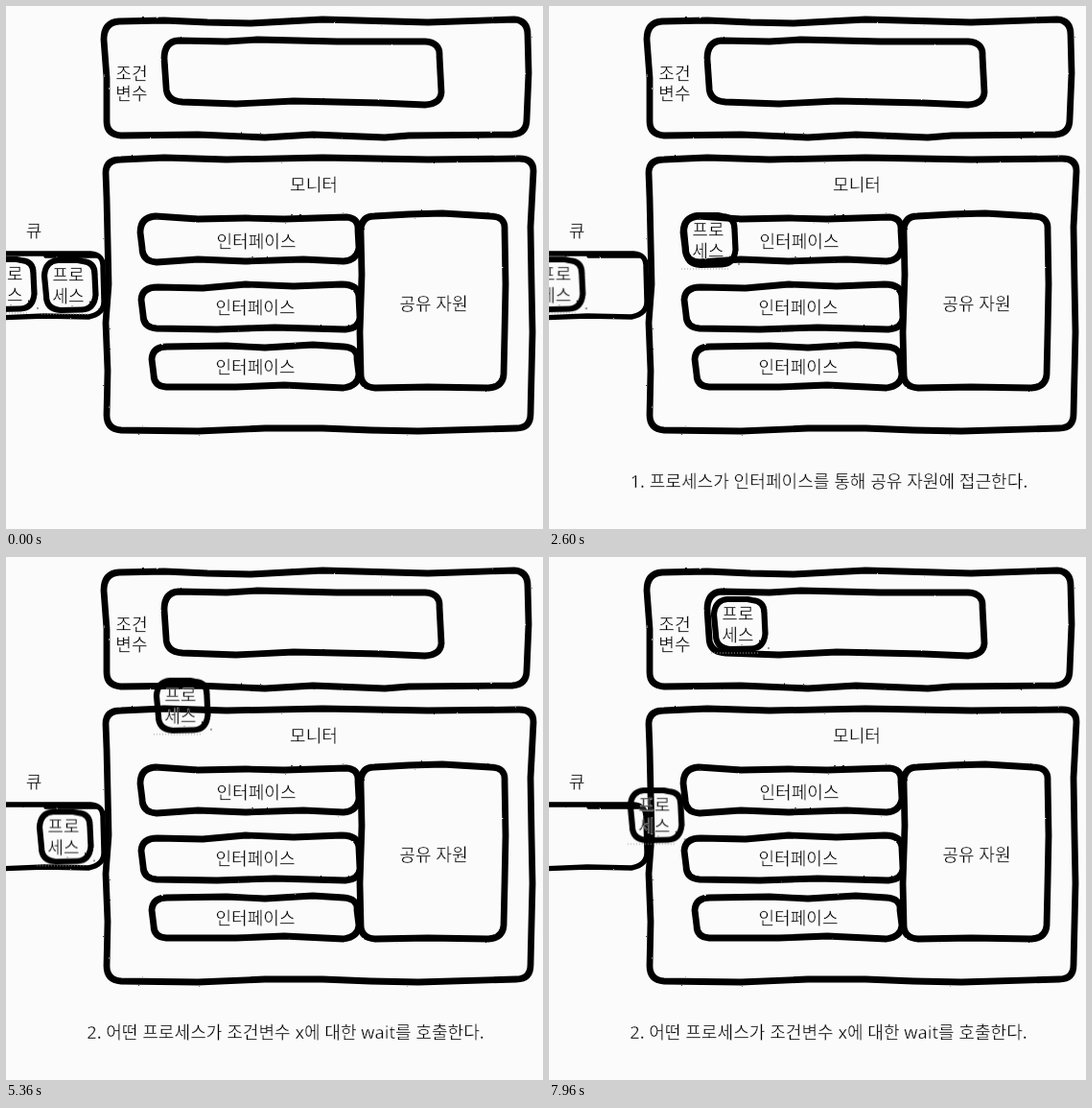
An HTML page that plays this animation: 560 px wide and 545 px high, repeating every 8 s.

```html
<!DOCTYPE html>
<html lang="ko">
<head>
<meta charset="utf-8">
<title>모니터</title>
<style>
html, body { margin: 0; width: 100%; height: 100%; overflow: hidden; background: #fbfbfb; }
svg { display: block; width: 560px; height: 545px; }
path { fill: none; stroke: #000; stroke-width: 6.8; stroke-linejoin: round; stroke-linecap: round; }
/* the thin page-coloured outline lightens the strokes of the letters */
text {
  font: 300 18.1px "Noto Sans", "Noto Sans CJK KR", "Noto Sans KR", "Noto Sans CJK", sans-serif;
  text-anchor: middle; fill: #000; stroke: #fbfbfb; stroke-width: .4;
}
.dust { stroke: #999; stroke-width: 1; stroke-dasharray: 1 2; stroke-linecap: butt; }
.dot { fill: #222; }
</style>
</head>
<body>
<svg viewBox="0 0 560 545">
  <defs>
    <filter id="rough" filterUnits="userSpaceOnUse" x="-60" y="-60" width="680" height="620" color-interpolation-filters="sRGB">
      <feTurbulence type="fractalNoise" baseFrequency=".2" numOctaves="2" seed="4"/>
      <feDisplacementMap in="SourceGraphic" scale="1.6" xChannelSelector="R" yChannelSelector="G"/>
    </filter>
    <g id="process">
      <g filter="url(#rough)">
        <path style="stroke-width:6.2" d="M-12 -26 L9 -26 L14 -25 Q27 -24 26.5 -11 L27.5 10 Q26 25 13 25.5 L-9 26 Q-24 25 -24 11 L-26 -10 Q-25 -25 -12 -26Z"/>
      </g>
      <path class="dust" d="M-29 30H22"/>
      <circle class="dot" cx="31" cy="25" r=".8"/>
      <text x="-1" y="-4">프로</text>
      <text x="-1" y="18">세스</text>
    </g>
  </defs>
  <g filter="url(#rough)">
    <!-- condition variable -->
    <path d="M118 16 L165 15 L210 17 L255 18 L330 14 L440 17 L530 14 Q544 15 544 30 L545 70 L543 118 Q543 133 528 134 L420 135 L395 137 L320 134 L270 137 L200 134 L120 135 Q105 134 105 120 L105 75 L102 35 Q102 17 118 16Z"/>
    <path d="M180 36 L230 37 L262 35 L345 37 L437 37 Q453 38 452 52 L454 90 Q453 102 437 103 L390 101 L300 99 L240 102 L184 100 Q167 99 167 84 L165 55 Q165 37 180 36Z"/>
    <!-- monitor -->
    <path d="M120 160 L165 158 L230 160 L330 158 L440 160 L535 159 Q550 159 550 172 L547 230 L548 290 L549 340 L547 425 Q547 440 532 440 L430 443 L380 442 L330 440 L270 440 L200 443 L120 442 Q105 441 105 426 L106 380 L104 330 L107 290 L105 200 L104 174 Q104 160 120 160Z"/>
    <!-- interfaces -->
    <path d="M156 219 L200 222 L250 221 L290 222 L355 220 Q368 221 367 234 L368 252 Q366 265 352 266 L310 264 L250 266 L200 264 L157 267 Q142 266 142 252 L140 236 Q140 220 156 219Z"/>
    <path d="M158 293 L205 294 L250 290 L300 292 L350 290 Q368 290 368 304 L369 325 Q368 336 354 337 L280 335 L220 337 L157 336 Q143 335 143 322 L141 306 Q142 293 158 293Z"/>
    <path d="M168 355 L230 354 L270 356 L320 353 L352 355 Q367 356 366 368 L368 384 Q367 396 352 398 L290 395 L240 397 L167 397 Q154 396 154 384 L152 368 Q153 355 168 355Z"/>
    <!-- shared resource -->
    <path d="M384 219 L420 217 L455 216 L505 219 Q521 219 520 233 L521 290 L520 340 L519 384 Q518 397 503 398 L440 397 L385 398 Q370 397 370 384 L369 340 L371 280 L370 235 Q370 219 384 219Z"/>
    <!-- queue -->
    <path style="stroke-width:5.4" d="M-10 258 L40 258 L88 258 Q102 259 101 272 L102 308 Q102 321 86 324 L40 323 L-10 325"/>
    <path style="stroke-width:3.4" d="M41 261 H94"/>
  </g>
  <g id="labels"></g>
  <use id="first" href="#process"/>
  <use id="second" href="#process"/>
</svg>
<script>
const LOOP = 8000;
const $ = id => document.getElementById(id);

function label(str, x, midY) {
  const t = document.createElementNS("http://www.w3.org/2000/svg", "text");
  t.textContent = str;
  t.setAttribute("x", x);
  t.setAttribute("y", midY + 6.5);
  return $("labels").appendChild(t);
}

// Each step is [time, ...values]; the loop repeats them.
function play(el, steps, easing, frame) {
  const frames = steps.map(([time, ...v]) => ({ offset: time / LOOP, easing, ...frame(...v) }));
  el.animate(frames, { duration: LOOP, iterations: Infinity });
}

const show = (el, steps) => play(el, steps, "step-end", opacity => ({ opacity }));

// Sine ease from one place to the next, sampled so a move may outlast the loop.
function move(el, stops) {
  const steps = [];
  stops.forEach(([t0, x0, y0], i) => {
    const [t1, x1, y1] = stops[i + 1] || [LOOP, x0, y0];
    for (let t = t0; t < Math.min(t1, LOOP); t += 50) {
      const k = (1 - Math.cos(Math.PI * (t - t0) / (t1 - t0))) / 2;
      steps.push([t, x0 + (x1 - x0) * k, y0 + (y1 - y0) * k]);
    }
    if (t1 >= LOOP && t0 < LOOP) {
      const k = (1 - Math.cos(Math.PI * (LOOP - t0) / (t1 - t0))) / 2;
      steps.push([LOOP, x0 + (x1 - x0) * k, y0 + (y1 - y0) * k]);
    }
  });
  play(el, steps, "linear", (x, y) => ({ transform: `translate(${x}px, ${y}px)` }));
}

label("조건", 131, 70);
label("변수", 131, 91);
label("모니터", 321, 186);
label("큐", 29, 234);
label("인터페이스", 261, 245);
label("인터페이스", 260, 314);
label("인터페이스", 260, 376);
label("공유 자원", 446, 310);
const access = label("1. 프로세스가 인터페이스를 통해 공유 자원에 접근한다.", 292, 495);
const wait = label("2. 어떤 프로세스가 조건변수 x에 대한 wait를 호출한다.", 291.5, 495);

show(access, [[0, 0], [1045, 1], [4750, 0], [LOOP, 0]]);
show(wait, [[0, 0], [4750, 1], [LOOP, 1]]);

move($("first"), [
  [0, 66, 291], [1000, 66, 291], [2300, 167, 244],
  [4700, 167, 244], [6000, 198, 70]
]);
move($("second"), [
  [0, 2, 290], [2300, 2, 290], [3800, 61, 291.5],
  [7000, 61, 291.5], [9000, 167, 244]
]);
</script>
</body>
</html>
```
